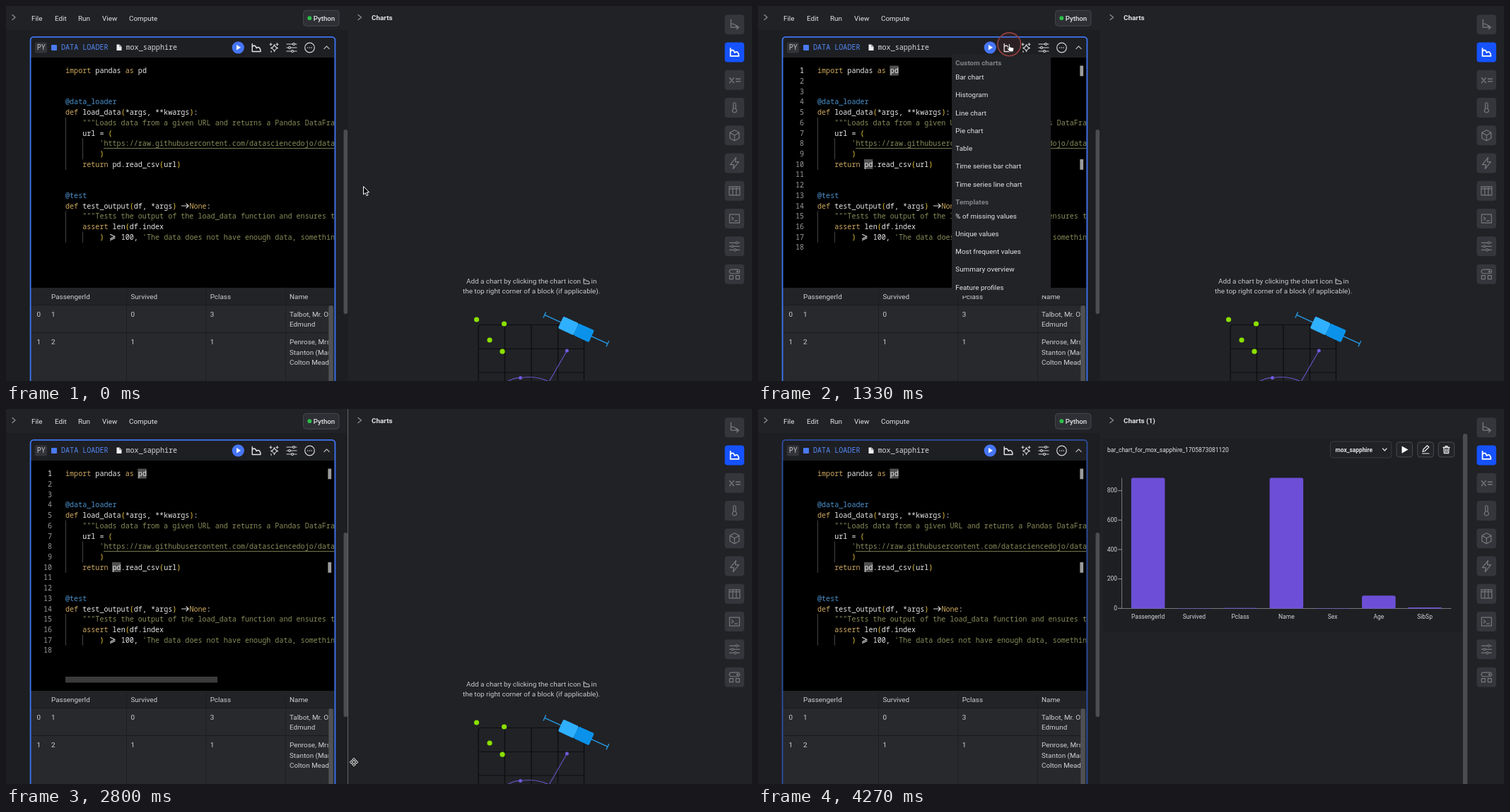
An HTML page for the animation above (4.69 s loop, 1055 by 531 pixels).

```html
<!DOCTYPE html>
<html lang="en">
<head>
<meta charset="utf-8">
<title>Notebook charts</title>
<style>
html, body { margin: 0; width: 100%; height: 100%; overflow: hidden; background: #202125; }
svg { display: block; width: 1055px; height: 531px; }
text { font: 9.9px Roboto, sans-serif; fill: #e4e4e6; white-space: pre; }
.code { font: 10.08px "Noto Sans Mono", "DejaVu Sans Mono", monospace; font-variant-ligatures: none; }
.line { fill: none; stroke-linecap: round; stroke-linejoin: round; }
</style>
</head>
<body>
<svg id="stage" viewBox="0 0 1055 531" xmlns="http://www.w3.org/2000/svg">
  <defs>
    <clipPath id="blockClip"><rect x="35" y="44" width="429.5" height="490"/></clipPath>
    <clipPath id="cellClip"><rect x="36" y="399" width="420.5" height="140"/></clipPath>
  </defs>
  <g id="base"></g>
  <g id="empty"></g>
  <g id="chart"></g>
  <g id="block"></g>
  <g id="menu"></g>
  <path id="divider" d="M483.5 0V531" stroke="#626367"/>
  <circle id="ring" fill="#a03838" fill-opacity=".1" stroke="#93403f" stroke-width="1.6"/>
  <g id="cursor">
    <path id="arrow" d="M0 0V11.5L2.7 9L4.6 13.2L6.5 12.3L4.6 8.3H8.2Z" fill="#000" stroke="#fff" stroke-width="1"/>
    <path id="hand" d="M-1 0Q0-1.6 1 0V3.6L5.6 4.7Q6.8 5 6.6 6.3L5.8 10.5H.4L-3 6.2Q-3.6 5-2.4 4.8L-1 6Z" fill="#fff" stroke="#111" stroke-width=".9"/>
    <path id="move" d="M0-6L2.3-3.4H.9V-.9H3.4V-2.3L6 0L3.4 2.3V.9H.9V3.4H2.3L0 6L-2.3 3.4H-.9V.9H-3.4V2.3L-6 0L-3.4-2.3V-.9H-.9V-3.4H-2.3Z" fill="#000" stroke="#fff" stroke-width=".9"/>
  </g>
</svg>
<script>
const LOOP = 4690, CW = 6.05, LH = 14.72;
const $ = id => document.getElementById(id);
const put = (id, ...parts) => { $(id).innerHTML += parts.flat(9).join(''); };

const rect = (x, y, w, h, fill, more = '') =>
  `<rect x="${x}" y="${y}" width="${w}" height="${h}" fill="${fill}" ${more}/>`;
const dot = (x, y, r, fill, more = '') => `<circle cx="${x}" cy="${y}" r="${r}" fill="${fill}" ${more}/>`;
const line = (d, color, w = 1, more = '') =>
  `<path class="line" d="${d}" stroke="${color}" stroke-width="${w}" ${more}/>`;
const esc = s => s.replace(/&/g, '&amp;').replace(/</g, '&lt;');
const text = (x, y, s, style = '', cls = '') =>
  `<text x="${x}" y="${y}" class="${cls}" style="${style}">${esc(s)}</text>`;
const code = (x, y, s, color) => text(x, y, s, `fill:${color}`, 'code');
const at = (x, y, body, scale = 1) => `<g transform="translate(${x} ${y}) scale(${scale})">${body}</g>`;

// Icons are drawn around their centre.
const areaIcon = (c, w = 1.4) => line('M-5.8-5.5V5.5H6V3.5Q4.8-.5 3-.5T.3.7Q-1-3-3.2-3T-5.6-.6', c, w);
const sliders = c => line('M-7-5H7M-7 0H7M-7 5H7', c, 1.2) +
  [[3, -5], [-3, 0], [1, 5]].map(([x, y]) => dot(x, y, 1.5, '#26272b', `stroke="${c}" stroke-width="1.1"`)).join('');
const sideIcons = [
  c => line('M-5-7V4H5M-5-1Q2-1 3 4M3 1.5L6 4L3 6.5', c, 1.3),
  c => areaIcon(c, 1.7),
  c => line('M-7-3L-1 4M-1-3L-7 4M2-1.5H8M2 2H8', c, 1.3),
  c => line('M-1.7 1V-6Q0-8.5 1.7-6V1', c, 1.2) + dot(0, 4, 3, 'none', `stroke="${c}" stroke-width="1.2"`),
  c => line('M0-7.5L6.5-4V4L0 7.5L-6.5 4V-4ZM-6.5-4L0-.3L6.5-4M0-.3V7.5', c, 1.2),
  c => line('M2-8L-6 2H-1L-2 8L6-2H1Z', c, 1.2),
  c => line('M-7.5-6H7.5V6H-7.5ZM-7.5-3H7.5M-2.5-6V6M2.5-6V6', c, 1.2),
  c => line('M-7-6H7V6H-7ZM-4-2L-1.5 0L-4 2M0 3H4', c, 1.2),
  c => sliders(c),
  c => line('M-4.5-6.5H4.5A2.8 2.8 0 0 1 4.5-.9H-4.5A2.8 2.8 0 0 1-4.5-6.5', c, 1.2) +
    dot(4, -3.7, 1.5, c) + line('M-7 2H-2V7H-7ZM2 2H7V7H2Z', c, 1.2)
];

function drawBase() {
  put('base',
    rect(0, 0, 1055, 531, '#212226'), rect(0, 34, 484, 497, '#1d1e22'),
    line('M9 12.5L13 16L9 19.5M498 12.5L502.5 16L498 19.5', '#8b8c90', 1.3),
    [['File', 36], ['Edit', 69], ['Run', 102], ['View', 136], ['Compute', 174]].map(([s, x]) => text(x, 20.6, s)),
    rect(420.5, 6.3, 50.5, 22, '#2e2f34', 'rx="4" stroke="#45464b"'),
    dot(429.3, 17.2, 2.9, '#2cc04b'), text(434.7, 20.6, 'Python', 'font-weight:500;font-size:9.7px'),
    rect(477.5, 175, 5.6, 261, '#4c4d51', 'rx="2.8"'),
    '<text id="title" x="517" y="19.6" style="font-weight:700"></text>',
    sideIcons.map((icon, i) => {
      const y = 26.2 + i * 39.27, on = i === 1;
      return rect(1016.5, y - 14, 27.5, 28, on ? '#1552fb' : '#35363b', 'rx="4"') +
        at(1030.3, y, icon(on ? '#fff' : '#77787d'));
    }));
}

function drawEmpty() {
  const box = rect(-24, -9.3, 24, 18.6, '#2fb0ff', 'rx="2"') + rect(0, -9.3, 24, 18.6, '#0a92ea', 'rx="2"');
  put('empty',
    text(651, 393, 'Add a chart by clicking the chart icon', 'fill:#c9c9cc'),
    at(821, 389.5, areaIcon('#d6d6d8'), .68), text(827.5, 393, 'in', 'fill:#c9c9cc'),
    text(646, 407.4, 'the top right corner of a block (if applicable).', 'fill:#c9c9cc'),
    line('M668 535V455Q668 451.5 671.5 451.5H814Q817.5 451.5 817.5 455V535M705.5 452V535M743 452V535M780.5 452V535M668 485.5H817.5M668 519H817.5', '#0c0c0e', 1.2),
    [[665.5, 444], [704.5, 450], [684, 473], [702, 489.2]].map(([x, y]) => dot(x, y, 3.6, '#8ae000')),
    line('M705 534Q718 526 727.5 526.5Q750 523 768 532L793.3 488', '#6251bd', 1.2),
    dot(793.3, 488, 2.5, '#7159dc'), dot(727.5, 526.5, 2.5, '#7159dc'),
    `<g transform="translate(806.3 457.8) rotate(24.6)">${line('M-49 0H49M-49-4V4M49-4V4', '#249ce8', 1.3)}${box}</g>`);
}

function drawChart() {
  const names = ['PassengerId', 'Survived', 'Pclass', 'Name', 'Sex', 'Age', 'SibSp'];
  const values = [891, 2, 3, 891, 2, 88, 7];
  const small = 'font-size:8.5px;fill:#d4d4d7';
  const button = x => rect(x, 47, 22.5, 21, '#232428', 'rx="3.5" stroke="#4a4b50"');
  put('chart',
    rect(488, 42, 507, 274, '#1e1f23', 'rx="4"'),
    text(494, 60.8, 'bar_chart_for_mox_sapphire_1705873081120', 'font-size:8.45px'),
    rect(809.5, 46, 86.5, 23, '#212226', 'rx="3.5" stroke="#3b3c41"'),
    text(816.5, 60.8, 'mox_sapphire', 'font-size:8.4px;font-weight:700'),
    line('M883.5 56L886.3 59L889 56', '#ddd', 1.2),
    button(903), button(932.8), button(962.2),
    '<path d="M910.5 52.5V62.7L919.5 57.6Z" fill="#fff"/>',
    line('M940 60.5L941 57L946.5 51.8L948.8 54L943.2 59.5ZM939.5 63H949', '#eee', 1.2),
    line('M969 54.5H978M972 54V52.6H975V54M970 55L970.4 62.5H976.6L977 55M972.4 57V60.6M974.6 57V60.6', '#eee', 1.3),
    line('M514.5 98V282.5H980', '#77787c'),
    [0, 200, 400, 600, 800].map(v => {
      const y = 282.3 - v * .2083;
      return line(`M509.5 ${y}H514`, '#98999c') + text(508, y + 2.8, String(v), small + ';text-anchor:end');
    }),
    names.map((s, i) => {
      const x = 551.6 + i * 65.25, h = values[i] * .2075;
      return rect(x - 23.8, 282.4 - h, 47.6, h, '#6c4fd6', `rx="${Math.min(2.5, h / 2)}"`) +
        text(x, 296.8, s, small + ';text-anchor:middle');
    }),
    rect(997, 35, 6.2, 500, '#4c4d50', 'rx="3"'));
}

const INK = { k: '#cfa95f', t: '#e6e6e6', d: '#4b91cc', s: '#888b58', p: '#f0c83c', u: '#888b58' };
// Each row: line number, start column, then ink and text pairs.
const ROWS = [
  [1, 0, 'k', 'import', 't', ' pandas ', 'k', 'as', 't', ' pd'],
  [4, 0, 'd', '@data_loader'],
  [5, 0, 'k', 'def', 't', ' load_data', 'p', '(', 't', '*args, **kwargs', 'p', ')', 't', ':'],
  [6, 4, 's', '"""Loads data from a given URL and returns a Pandas DataFrame'],
  [7, 4, 't', 'url = ', 'p', '('],
  [8, 8, 's', "'", 'u', 'https://raw.githubusercontent.com/datasciencedojo/datasets'],
  [9, 8, 'p', ')'],
  [10, 4, 'k', 'return', 't', ' pd.read_csv', 'p', '(', 't', 'url', 'p', ')'],
  [13, 0, 'd', '@test'],
  [14, 0, 'k', 'def', 't', ' test_output', 'p', '(', 't', 'df, *args', 'p', ')', 't', '   ', 'k', 'None', 't', ':'],
  [15, 4, 's', '"""Tests the output of the load_data function and ensures that'],
  [16, 4, 'k', 'assert', 't', ' len', 'p', '(', 't', 'df.index'],
  [17, 8, 'p', ')', 't', '    100, ', 's', "'The data does not have enough data, something"]
];
const baseline = n => 95.2 + (n - 1) * LH;

function codeRow([n, col, ...parts]) {
  let out = '';
  for (let i = 0; i < parts.length; i += 2) {
    const s = parts[i + 1], lead = s.length - s.trimStart().length;
    out += code(84 + (col + lead) * CW, baseline(n), s.trim(), INK[parts[i]]);
    col += s.length;
  }
  return out;
}

function drawBlock() {
  const numbers = Array.from({ length: 18 }, (_, i) =>
    `<text class="code" x="65" y="${baseline(i + 1)}" text-anchor="end" style="fill:${i ? '#9a9a9a' : '#f2f2f2'}">${i + 1}</text>`);
  const cell = (x, y, s) => text(x, y, s, 'fill:#cfcfd2');
  put('block', '<g clip-path="url(#blockClip)">',
    rect(35, 44, 431, 29, '#1e1f23'), rect(35, 73, 431, 326, '#000'),
    rect(41, 51.5, 17, 15, '#33343a', 'rx="2"'), code(43.7, 62, 'PY', '#c8c8cb'),
    rect(64, 55, 8, 8, '#4a7af2', 'rx="1"'), code(78, 62, 'DATA LOADER', '#5286f0'),
    '<path d="M156.5 54.5H160.5L163.5 57.5V63H156.5Z" fill="#f1f1f1"/>',
    line('M160.5 54.5V57.5H163.5', '#777', .8), code(169.5, 62, 'mox_sapphire', '#d8d8da'),
    dot(328.3, 58.8, 8.6, '#4676f5'), '<path d="M326 55V62.6L332 58.8Z" fill="#fff"/>',
    at(354, 59, areaIcon('#e4e4e6')),
    at(379, 59, line('M.5-4.5Q1.5-.5 5.5.5Q1.5 1.5.5 5.5Q-.5 1.5-4.5.5Q-.5-.5.5-4.5ZM4.5-6.5V-3M2.8-4.8H6.2M-4.5-6.5V-3M-6.2-4.8H-2.8M-4 4.5V6.5', '#d8d8da', 1.1)),
    at(404, 59, sliders('#d8d8da')),
    at(429.5, 59, dot(0, 0, 6.8, 'none', 'stroke="#d8d8da" stroke-width="1.2"') +
      [-2.7, 0, 2.7].map(x => dot(x, 0, .8, '#d8d8da')).join('')),
    line('M449.8 60.6L453.5 57L457.2 60.6', '#b9b9bc', 1.2),
    '<g id="match">', rect(186.3, 84.5, 12.5, 14, '#505050'), rect(150, 217, 12.3, 14, '#505050'),
    rect(455.3, 84.5, 4.8, 14.8, '#9b9b9b'), rect(455.3, 217, 4.8, 14.8, '#9b9b9b'), '</g>',
    rect(198.8, 84.5, 1.1, 14, '#ddd', 'id="caret"'),
    line('M84.5 158V231.5M84.5 290.5V334.5M108.5 187.5V217M108.5 320V334.5', '#424242'),
    ROWS.map(codeRow), line('M138.5 201.5H465', '#777a4e'),
    line('M248.5 283H258M255 280L258.2 283L255 286', '#d8d8d8', 1.1),
    line('M147.6 323.4L154 326.4L147.6 329.4M147.6 331.5L154 328.6', '#e0e0e0', 1.1),
    '<g id="gutter">', numbers, '</g>', rect(84, 379, 215, 8.5, '#3b3b3b', 'id="scroll"'),
    rect(35, 399, 431, 24, '#222327'), rect(35, 423, 431, 110, '#28292d'),
    line('M35 423.5H465M35 462.5H465', '#1a1b1e'),
    line('M170.5 399V531M283 399V531M395.5 399V531', '#1d1e21'),
    '<g clip-path="url(#cellClip)">',
    [[64, 'PassengerId'], [176.5, 'Survived'], [288.7, 'Pclass'], [401, 'Name']].map(([x, s]) => cell(x, 414.7, s)),
    [['0', '1', '0', '3'], ['1', '2', '1', '1']].map((row, r) =>
      [43.5, 64, 176.5, 288.7].map((x, i) => cell(x, 440 + r * 39.3, row[i]))),
    [[440, 'Talbot, Mr. Owain'], [454, 'Edmund'], [479.3, 'Penrose, Mrs.'], [493.5, 'Stanton (Marie'], [507.6, 'Colton Meade)']]
      .map(([y, s]) => cell(401, y, s)),
    '</g>', rect(456.3, 424, 6.4, 120, '#505154', 'rx="3"'), '</g>',
    rect(34.6, 43.8, 430.8, 500, 'none', 'rx="4.5" stroke-width="1.8" id="frame"'));
}

function drawMenu() {
  const group = (title, y, first, items) => text(279.3, y, title, 'font-weight:700;fill:#828388') +
    items.map((s, i) => text(279.3, first + i * 25.23, s)).join('');
  put('menu', rect(274, 68.5, 140, 341.5, '#222327', 'rx="2"'),
    rect(274, 88, 140, 25, '#47484a', 'id="hover"'),
    group('Custom charts', 84.2, 104.2, ['Bar chart', 'Histogram', 'Line chart', 'Pie chart', 'Table',
      'Time series bar chart', 'Time series line chart']),
    group('Templates', 280.7, 300.6, ['% of missing values', 'Unique values', 'Most frequent values',
      'Summary overview', 'Feature profiles']));
}

drawBase(); drawEmpty(); drawChart(); drawBlock(); drawMenu();

// Pointer keys: time, x, y.
const PATH = [[0, 505.5, 255.5], [350, 505.5, 255.5], [630, 384, 92], [840, 366.5, 59], [1020, 355.3, 54.3],
  [1440, 355.3, 54.3], [1890, 364, 103.2], [2270, 364, 103.2], [2730, 492, 500], [2870, 492, 500], [2980, 499, 545]];

function pointer(t) {
  for (let i = 1; i < PATH.length; i++) {
    const [t0, x0, y0] = PATH[i - 1], [t1, x1, y1] = PATH[i];
    if (t < t1) {
      const p = (t - t0) / (t1 - t0), e = p * p * (3 - 2 * p);
      return [x0 + (x1 - x0) * e, y0 + (y1 - y0) * e];
    }
  }
  return [499, 545];
}

const show = (id, on) => { $(id).style.display = on ? '' : 'none'; };
const within = (t, a, b) => t >= a && t < b;
const CLICKS = [1190, 2100], CLICK_TIME = 210;

function render(t) {
  const [x, y] = pointer(t), done = t >= 3150;
  const menu = within(t, 1260, 2240), drag = within(t, 2650, 3000);
  const hand = within(t, 960, 2400), gutter = within(t, 490, 3010);
  const click = CLICKS.find(c => within(t, c, c + CLICK_TIME));
  show('empty', !done);
  show('chart', done);
  $('title').textContent = done ? 'Charts (1)' : 'Charts';
  show('gutter', gutter);
  show('scroll', gutter && !menu);
  show('match', t >= 630);
  show('caret', within(t, 630, 1130));
  show('menu', menu);
  show('hover', y > 88);
  show('divider', within(t, 2650, 2940));
  show('ring', click !== undefined);
  if (click !== undefined) $('ring').setAttribute('r', 13.7 + (t - click) * .019);
  $('ring').setAttribute('transform', `translate(${x} ${y})`);
  $('frame').setAttribute('stroke', t < 3010 ? '#3f76f2' : '#2b4f9f');
  show('cursor', t < 2980);
  $('cursor').setAttribute('transform', `translate(${x} ${y})`);
  show('arrow', !hand && !drag);
  show('hand', hand);
  show('move', drag);
}

function tick() {
  render(performance.now() % LOOP);
  requestAnimationFrame(tick);
}
tick();
</script>
</body>
</html>
```
